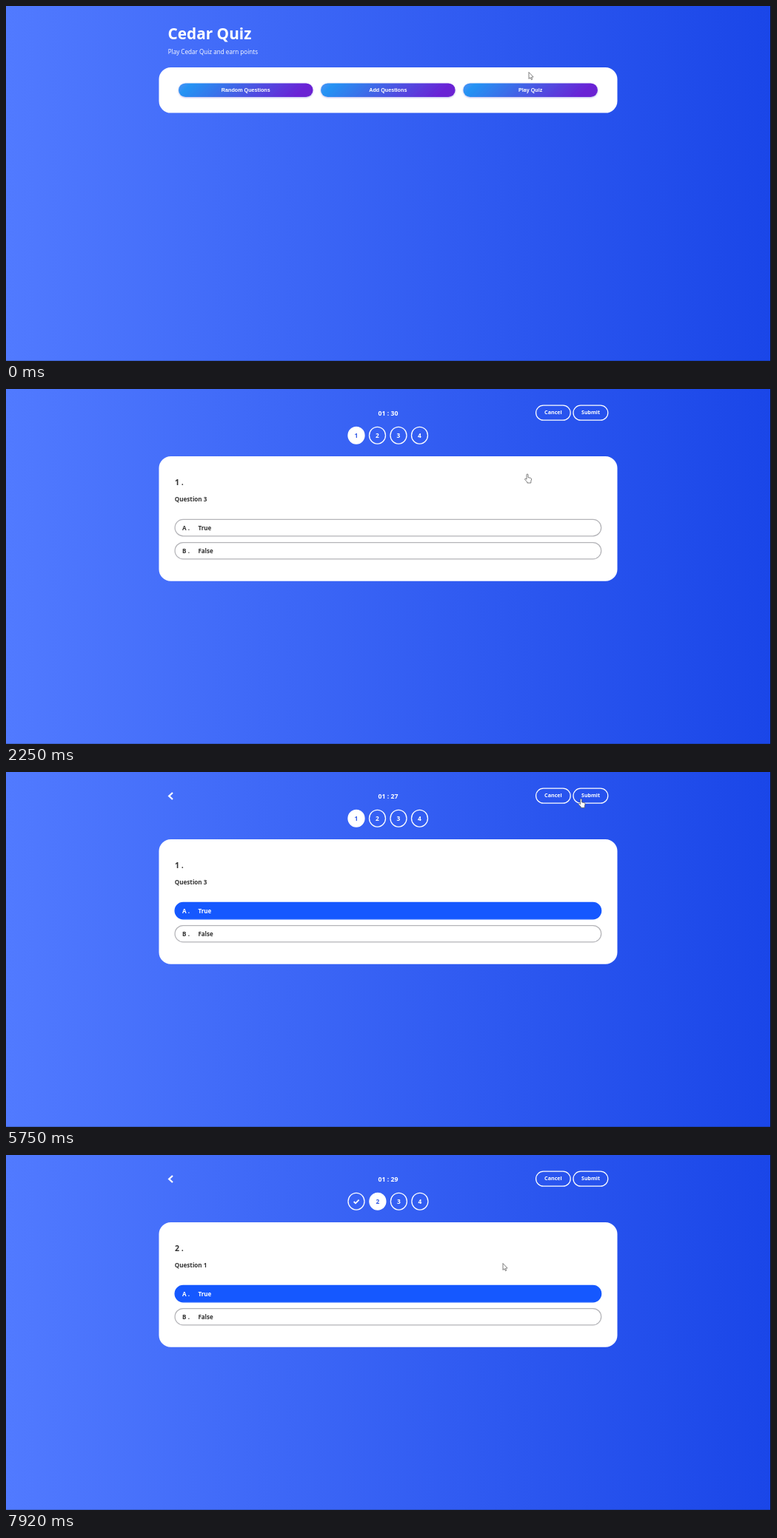
An HTML page that plays this animation: 1033 px wide and 480 px high, repeating every 8000 ms.

```html
<!DOCTYPE html>
<html lang="en">
<head>
<meta charset="utf-8">
<title>Quiz</title>
<style>
  html, body { margin: 0; width: 100%; height: 100%; overflow: hidden; }
  svg { display: block; width: 1033px; height: 480px; }
  text { font: 700 8px "Open Sans", "Noto Sans", sans-serif; white-space: pre; }
  .arial { font-family: "Liberation Sans", Arial, sans-serif; }
</style>
</head>
<body>
<svg viewBox="0 0 1033 480">
  <defs>
    <linearGradient id="sky">
      <stop stop-color="#517aff"/>
      <stop offset="1" stop-color="#1a46e8"/>
    </linearGradient>
    <filter id="glow" x="-5%" y="-30%" width="110%" height="180%">
      <feDropShadow dx="0" dy=".8" stdDeviation=".9" flood-color="#4a4ad0" flood-opacity=".45"/>
    </filter>
  </defs>
  <rect width="1033" height="480" fill="url(#sky)"/>
  <path d="M0 479.6H1033" stroke="#123" stroke-opacity=".35" stroke-width=".8"/>
  <rect x="1032" width="1" height="480" fill="#0a0f20"/>
  <g id="page"></g>
  <g id="cursor" fill="#fff" stroke="#555" stroke-width=".75" stroke-linejoin="round">
    <path id="arrow" d="M0 0V9L2 7.2L3.4 10.2L4.7 9.6L3.4 6.8L6.1 6.5Z"/>
    <path id="hand" d="M-1 1a1 1 0 0 1 2 0V4.6L4.6 5.4Q5.6 5.8 5.5 7L4.8 10.2V12H-.2V10.8L-3.4 7.4Q-3.6 6 -2.2 6.2L-1 7.2Z"/>
  </g>
</svg>
<script>
const $ = id => document.getElementById(id);
const LOOP = 8000, RATE = 12;

// Times below are in ticks of 1/12 s.
const QUIZ = 27, BACK = 31, NEXT = 76;
const PICKS = [58, 93];
const CLOCK = [[0, 30], [40, 29], [52, 28], [64, 27], [NEXT, 30], [89, 29]];
const PATH = [
  [0, 706, 89.5], [13, 706, 89.5], [16, 704, 111], [19, 704, 115], [39, 704, 115],
  [50, 582.5, 183], [60, 582.5, 183], [69, 776.5, 36.3], [80, 776.5, 36.3],
  [89, 632, 183], [93, 632, 183], [95, 671, 146.5], [96, 688, 131]
];

const text = (s, x, y, size, fill = '#fff', extra = '') =>
  `<text x="${x}" y="${y}" fill="${fill}" style="font-size:${size}px" ${extra}>${s}</text>`;
const mid = (s, x, y, size, fill = '#fff', extra = '') =>
  text(s, x, y, size, fill, 'text-anchor="middle" ' + extra);
const box = (x, y, w, h, r, fill, stroke = 'none') =>
  `<rect x="${x}" y="${y}" width="${w}" height="${h}" rx="${r}" fill="${fill}" stroke="${stroke}" stroke-width="1.25"/>`;

function homeButton(label, x, i) {
  const w = 181.5, h = 18.6, y = 104.4, d = (w + h) / 4, cx = x + w / 2, cy = y + h / 2;
  const stops = [[0, '#5191f6'], [.09, '#2493f3'], [.88, '#6a22d5'], [1, '#6d1fd0']]
    .map(([o, c]) => `<stop offset="${o}" stop-color="${c}"/>`).join('');
  return `<linearGradient id="b${i}" gradientUnits="userSpaceOnUse" x1="${cx - d}" y1="${cy - d}" x2="${cx + d}" y2="${cy + d}">${stops}</linearGradient>`
    + `<g filter="url(#glow)">${box(x, y, w, h, h / 2, `url(#b${i})`)}</g>`
    + mid(label, cx, 116.1, 7.2, '#fff', 'class="arial"');
}

const home = () =>
  text('Cedar Quiz', 218.5, 44.8, 20.8)
  + text('Play Cedar Quiz and earn points', 218.7, 64.5, 8.15, '#fff', 'font-weight="400" class="sub"').replace('style="', 'style="font-weight:400;')
  + box(206.5, 83, 619, 61.6, 16, '#fff')
  + homeButton('Random Questions', 233, 0)
  + homeButton('Add Questions', 425.1, 1)
  + homeButton('Play Quiz', 617.4, 2);

function step(i, current) {
  const x = 473 + 28.5 * i + (current && i ? .4 : 0), y = 62.7, on = i === current;
  const mark = i < current
    ? `<path d="M469.7 63l2.3 2.3l4.6-4.6" fill="none" stroke="#fff" stroke-width="1.8"/>`
    : mid(i + 1, x, 66.1, 8.4, on ? '#3158e6' : '#fff');
  return `<ellipse cx="${x}" cy="${y}" rx="11" ry="11.4" fill="${on ? '#fff' : 'none'}" stroke="#fff" stroke-width="1.3"/>` + mark;
}

function answer(letter, label, y, picked) {
  const ink = picked ? '#fff' : '#333';
  return box(228.1, y, 575.6, 22.4, 11.2, picked ? '#1558ff' : '#fff', picked ? '#1558ff' : '#b4b4b8')
    + text(letter + ' .', 238.1, y + 14.5, 8.1, ink)
    + text(label, 259.4, y + 14.5, 8, ink);
}

const quiz = (n, seconds, picked, back) =>
  (back ? '<path d="M225 28l-4.8 4.5l4.8 4.5" fill="none" stroke="#fff" stroke-width="2.3"/>' : '')
  + mid('01 : ' + seconds, 516, 35.6, 8.7)
  + box(715.6, 22.2, 46.6, 20, 10, 'none', '#fff') + mid('Cancel', 738.9, 34.4, 7.15)
  + box(766, 22.2, 46.8, 20, 10, 'none', '#fff') + mid('Submit', 789.5, 34.4, 7)
  + [0, 1, 2, 3].map(i => step(i, n)).join('')
  + box(206.5, 91, 619, 168.7, 16, '#fff')
  + text(n + 1 + ' .', 228, 129.8, 10.6, '#333')
  + text('Question ' + (n ? 1 : 3), 227.8, 152.2, 8.1, '#333')
  + answer('A', 'True', 176.4, picked)
  + answer('B', 'False', 207.5, false);

function pointer(k) {
  const i = PATH.findIndex(p => p[0] > k), [t0, x0, y0] = PATH[i - 1], [t1, x1, y1] = PATH[i];
  const u = (k - t0) / (t1 - t0), e = u * u * (3 - 2 * u);
  return [x0 + (x1 - x0) * e, y0 + (y1 - y0) * e];
}

function overLink(k, x, y) {
  if (k < 40) return y > 104;
  const row = x > 228 && x < 804 && (y > 176 && y < 199 || y > 207 && y < 230);
  return row || x > 766 && y > 22 && y < 43;
}

let shown = '';
function draw(now) {
  const k = Math.floor((now % LOOP + 4) * RATE / 1000) % (LOOP * RATE / 1000);
  const n = k < NEXT ? 0 : 1;
  const seconds = CLOCK.filter(c => c[0] <= k).pop()[1];
  const html = k < QUIZ ? home() : quiz(n, seconds, k >= PICKS[n], k >= BACK);
  if (html !== shown) $('page').innerHTML = shown = html;

  const [x, y] = pointer(k), hand = overLink(k, x, y);
  $('cursor').setAttribute('transform', `translate(${x} ${y})`);
  $('hand').style.display = hand ? '' : 'none';
  $('arrow').style.display = hand ? 'none' : '';
}

const start = performance.now();
function loop() {
  draw(performance.now() - start);
  requestAnimationFrame(loop);
}
loop();
</script>
</body>
</html>
```
